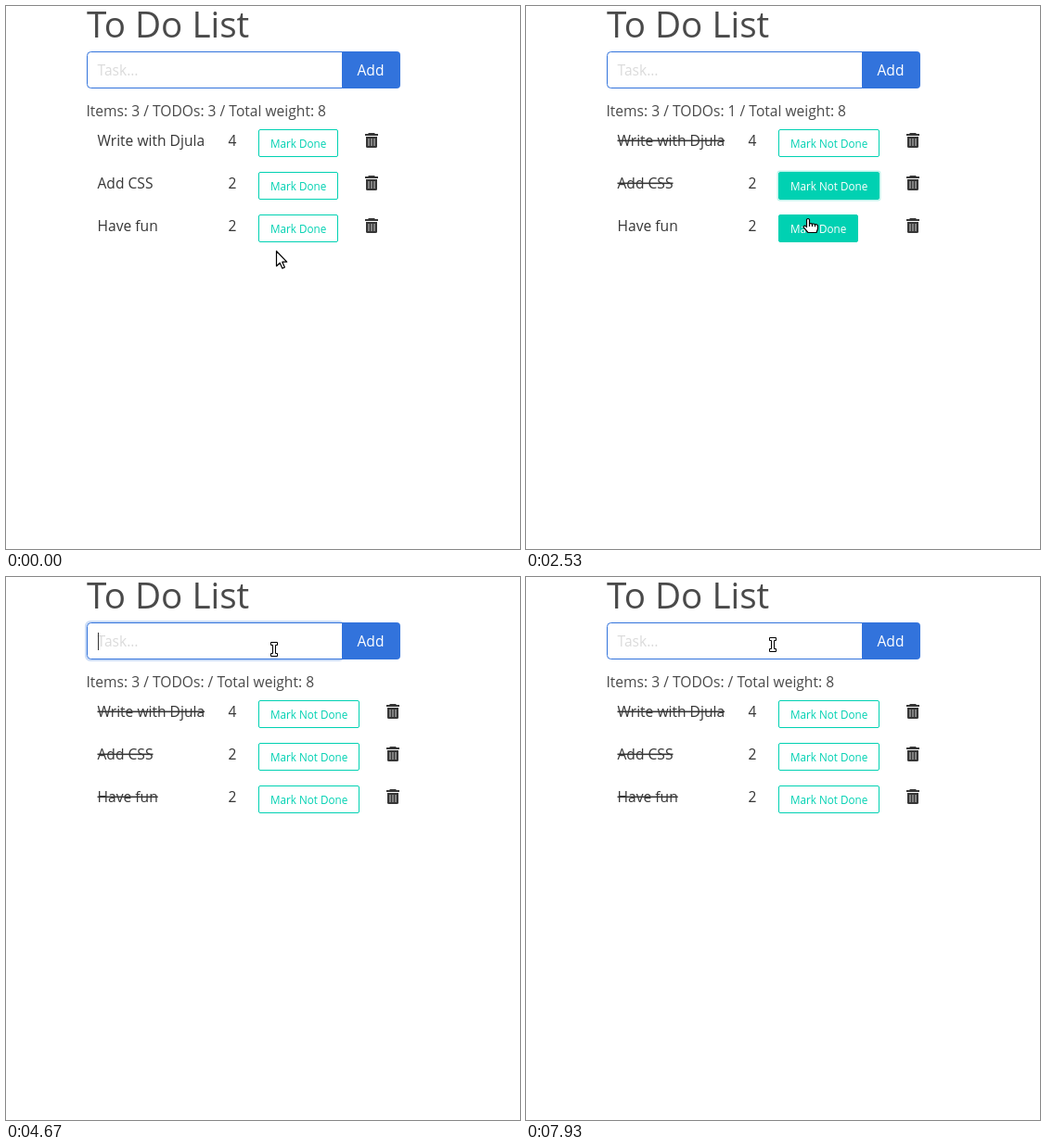
These frames come from a looping animation (554 by 586 pixels, 8 s). An HTML page:

```html
<!DOCTYPE html>
<html lang="en">
<head>
<meta charset="utf-8">
<title>To Do List</title>
<style>
  html, body { margin: 0; width: 100%; height: 100%; overflow: hidden; background: #fff; }
  svg { display: block; }
  text { font: 15.6px "Open Sans", "Noto Sans", sans-serif; fill: #363636; }
  .title { font-size: 38.6px; fill: #4a4a4a; }
  .sum { fill: #4a4a4a; }
  .hint { fill: #dbdbdb; }
  .light { fill: #fff; }
  .done { text-decoration: line-through; }
  .btn text { font-size: 11.7px; fill: #00d1b2; }
  .btn rect { fill: #fff; stroke: #00d1b2; }
  .btn.on text { fill: #fff; }
  .btn.on rect { fill: #00d1b2; }
  .btn rect.ring { fill: none; stroke-width: 1.5; stroke-opacity: .25; }
  .cursor { fill: #fff; stroke: #000; stroke-linejoin: round; }
</style>
</head>
<body>
<svg id="stage" width="554" height="586" viewBox="0 0 554 586">
  <defs>
    <g id="trash" fill="#363636">
      <path d="M4 0h6l1 1h3v2H0V1h3z"/>
      <path d="M1 4h12v10.5q0 1.5-1.5 1.5h-9Q1 16 1 14.5z"/>
      <path d="M4 6v8M7 6v8M10 6v8" stroke="#b4b4b4" stroke-width="1.2"/>
    </g>
    <path id="arrow" class="cursor" stroke-width="1.2" d="M.5.5v16.2l3.7-3.5 2.6 5.9 2.6-1.1-2.6-5.8h4.9z"/>
    <path id="hand" class="cursor" stroke-width="1.2" d="M-1.5 1.5Q0-.5 1.5 1.5V6Q3 5 4.5 6.3 6 5.5 7.5 6.8 9.5 6 10.5 8v3.5L9 15.5H0L-5 9.6Q-4.5 7.3-2.5 8.6L-1.5 9.6zM1.5 6v3M4.5 6.3V9M7.5 6.8v2.4"/>
    <path id="beam" class="cursor" d="M-3.5-7.5h7v3H1.5v9h2v3h-7v-3h2v-9h-2z"/>
  </defs>
  <text class="title" x="87" y="34">To Do List</text>
  <path d="M362 49h59q4 0 4 4v32q0 4-4 4h-59z" fill="#3273dc"/>
  <text class="light" x="378.5" y="75">Add</text>
  <path d="M362.5 49.5H91.5q-4 0-4 4v31q0 4 4 4h271z" fill="#fff" stroke="#3273dc"/>
  <g id="view"></g>
</svg>
<script>
const LOOP = 8000, STEP = 200 / 3;
const view = document.getElementById('view');

// pointer path: step, x, y
const path = [
  [6, 291, 264], [10, 299, 222], [14, 308, 167], [15, 308, 159], [18, 308, 151],
  [27, 308, 151], [29, 306, 176], [31, 304, 194], [34, 304, 194], [37, 304, 227],
  [38, 304, 229], [58, 304, 229], [61, 301, 190], [65, 292, 104], [68, 289, 78],
  [97, 289, 78], [98, 310, 126], [101, 368, 222], [105, 411, 285],
  [112, 411, 285], [114, 377, 227], [117, 291, 100], [119, 266, 73]
];

// steps at which each row is pressed, then toggled
const tasks = [
  { name: 'Write with Djula', weight: 4, press: [22], flip: [23] },
  { name: 'Add CSS', weight: 2, press: [33], flip: [34] },
  { name: 'Have fun', weight: 2, press: [40, 48, 56], flip: [41, 50, 57] },
  { name: 'uie', weight: 4, press: [], flip: [], from: 90, to: 109 }
];
const FOCUS = 70, TYPE = 79, SUBMIT = 90, BLUR = 108;

const between = (n, a, b) => n >= a && n < b;
const inside = (p, x, y, w, h) => between(p[0], x, x + w) && between(p[1], y, y + h);

function pointAt(n) {
  if (n <= path[0][0]) return path[0].slice(1);
  const i = path.findIndex(p => p[0] >= n);
  if (i < 0) return path[path.length - 1].slice(1);
  const [a, ax, ay] = path[i - 1], [b, bx, by] = path[i];
  const k = (n - a) / (b - a);
  return [Math.round(ax + (bx - ax) * k), Math.round(ay + (by - ay) * k)];
}

function focusAt(n) {
  if (n >= BLUR) return null;
  if (n >= FOCUS) return 'input';
  let last = null, when = -1;
  tasks.forEach((task, i) => task.press.forEach(p => {
    if (p <= n && p > when) { when = p; last = i; }
  }));
  return last;
}

function button(y, wide, filled, ring) {
  const w = wide ? 109 : 86;
  return `<g class="btn ${filled ? 'on' : ''}">
    ${ring ? `<rect class="ring" x="271.25" y="${y - .75}" width="${w + 1.5}" height="31.5" rx="2.5"/>` : ''}
    <rect x="272.5" y="${y + .5}" width="${w - 1}" height="29" rx="1.5"/>
    <text x="285" y="${y + 20}">${wide ? 'Mark Not Done' : 'Mark Done'}</text></g>`;
}

function field(n) {
  const focused = focusAt(n) === 'input';
  const typed = between(n, TYPE, SUBMIT) ? 'uie'.slice(0, n - TYPE + 1) : '';
  const caretOn = focused && !between(n, 87, SUBMIT) && !between(n, 99, 106);
  const caret = 99 + [0, 9, 13, 22][typed.length];
  return `<text class="${typed ? '' : 'hint'}" x="98.5" y="75">${typed || 'Task…'}</text>` +
    (focused ? '<rect x="86" y="48" width="278" height="42" rx="5" fill="none" stroke="#3273dc" stroke-opacity=".25" stroke-width="2"/>' : '') +
    (caretOn ? `<rect x="${caret}" y="60" width="1" height="19" fill="#363636"/>` : '');
}

function draw(n) {
  const rows = tasks.filter(t => n >= (t.from || 0) && n < (t.to || Infinity))
    .map(t => ({ ...t, done: t.flip.filter(f => f <= n).length % 2 === 1 }));
  const todo = rows.filter(r => !r.done).length;
  const total = rows.reduce((sum, r) => sum + r.weight, 0);
  const binX = rows.some(r => r.done) ? 410 : 387;
  const focus = focusAt(n), point = pointAt(n), before = pointAt(n - 1);
  let shape = 'arrow';
  if (inside(point, 87, 49, 275, 40) || inside(point, 87, 101, 269, 26)) shape = 'beam';

  let out = field(n) +
    `<text class="sum" x="86.5" y="119">Items: ${rows.length} / TODOs: ${todo ? todo + ' ' : ''}/ Total weight: ${total}</text>`;
  rows.forEach((row, i) => {
    const y = 133 + 46 * i, w = row.done ? 109 : 86;
    const hover = inside(before, 272, y, w, 30) && inside(point, 272, y, w, 30);
    const pressed = row.press.includes(n);
    if (inside(point, 272, y, w, 30) || inside(point, binX - 5, y, 24, 24)) shape = 'hand';
    out += `<text class="${row.done ? 'done' : ''}" x="98.5" y="${y + 18}">${row.name}</text>
      <text x="239.5" y="${y + 18}">${row.weight}</text>
      ${button(y, row.done, hover || focus === i, focus === i && !pressed)}
      <use href="#trash" x="${binX}" y="${y + 4}"/>`;
  });
  view.innerHTML = out + `<use href="#${shape}" x="${point[0]}" y="${point[1]}"/>`;
}

let shown = -1;
function tick() {
  const n = Math.floor((performance.now() % LOOP + 4) / STEP) % 120;
  if (n !== shown) draw(shown = n);
  requestAnimationFrame(tick);
}
tick();
</script>
</body>
</html>
```
